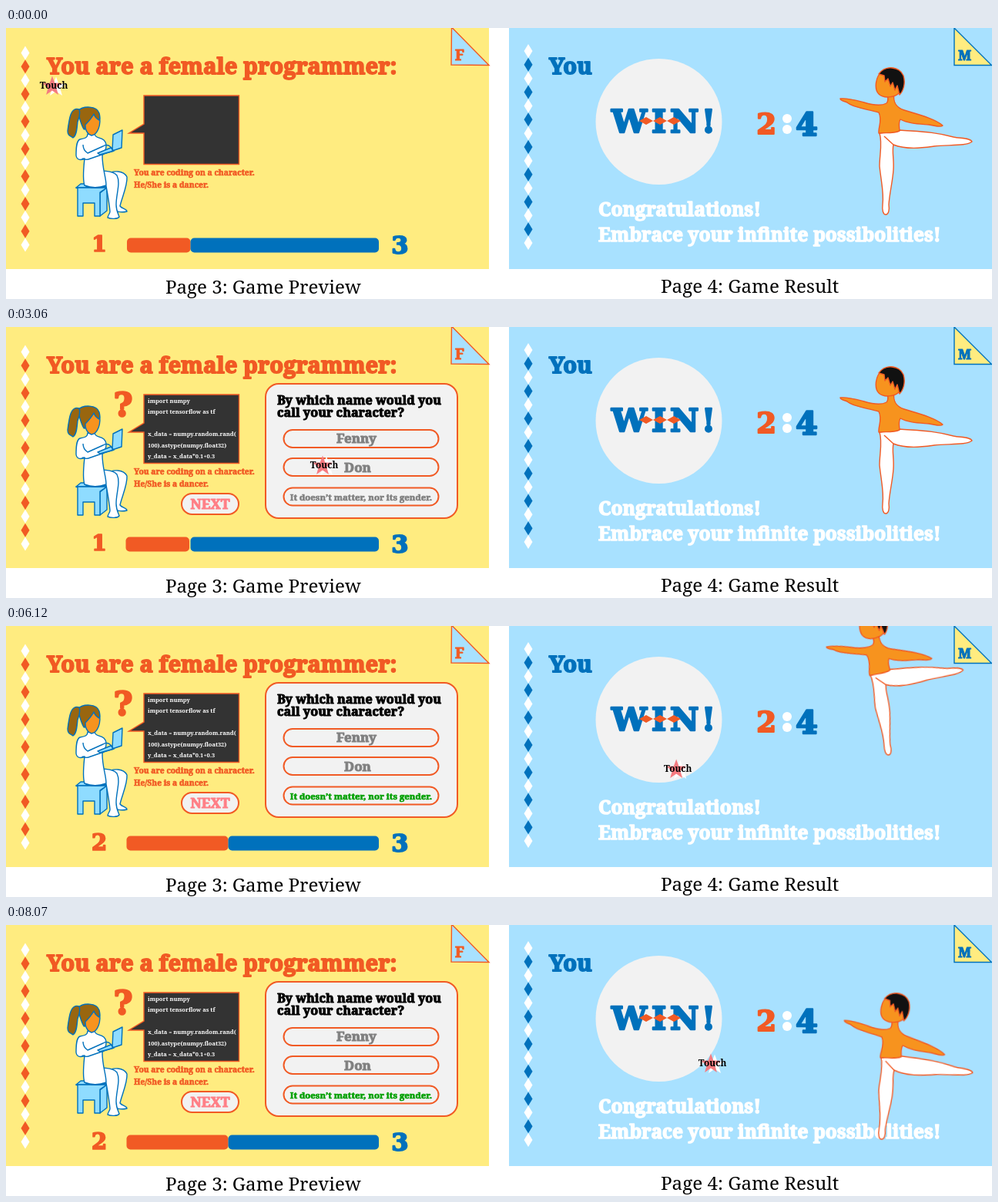
These frames come from a looping animation (1280 px wide and 353 px high, 8100 ms). An HTML page:

```html
<!DOCTYPE html>
<html lang="en">
<head>
<meta charset="utf-8">
<title>Game preview and result</title>
<style>
html, body { margin: 0; width: 100%; height: 100%; overflow: hidden; background: #fff; }
svg { display: block; width: 100%; height: 100%; }
text { font-family: "Noto Serif", "Liberation Serif", serif; white-space: pre; }
.b { font-weight: 700; fill: currentColor; stroke: currentColor; stroke-width: .06em; stroke-linejoin: round; }
.wide { font-family: "DejaVu Serif", "Noto Serif", serif; }
.thin { font-weight: 700; }
.code { font-weight: 700; font-size: 7.5px; fill: #fff; }
.mid { text-anchor: middle; }
.red { color: #f15a24; }
.blue { color: #0071bc; }
.white { color: #fff; }
.gray { color: #808080; }
.pink { color: #ff7f86; }
.box { fill: #f2f2f2; stroke: #f15a24; stroke-width: 2; }
.lady { stroke: #0071bc; stroke-width: 1.4; stroke-linejoin: round; }
.man { stroke: #f15a24; stroke-width: 1.4; stroke-linejoin: round; }

.a { animation: 8100ms linear infinite; }
#touch { animation-name: touch; animation-timing-function: ease-in-out; }
#dancer { animation-name: leap; animation-timing-function: cubic-bezier(.37, 0, .63, 1); transform-origin: 1150px 130px; }
#next { animation-name: next; animation-timing-function: step-end; }
#ask { animation-name: ask; transform-origin: 152px 100px; }
#panel { animation-name: panel; animation-timing-function: step-end; }
#answer { animation-name: answer; animation-timing-function: step-end; }
#one { animation-name: one; animation-timing-function: step-end; }
#two { animation-name: two; animation-timing-function: step-end; }
#done { animation-name: done; animation-timing-function: ease-in-out; }
#left { animation-name: left; animation-timing-function: ease-in-out; }

@keyframes touch {
  0%, 7.4% { transform: translate(62px, 75px); }
  17.9% { transform: translate(365px, 153px); }
  25.2%, 31.1% { transform: translate(268px, 232px); }
  37.78% { transform: translate(413px, 180px); }
  43.2% { transform: translate(452px, 123px); }
  48.8% { transform: translate(566px, 205px); }
  51.5% { transform: translate(552px, 220px); }
  52.3% { transform: translate(553px, 224px); }
  59% { transform: translate(553px, 225px); animation-timing-function: ease-in; }
  62.2% { transform: translate(604px, 224px); animation-timing-function: linear; }
  75.56% { transform: translate(872px, 186px); animation-timing-function: ease-out; }
  79.5%, 100% { transform: translate(917px, 180px); }
}
@keyframes leap {
  0%, 66.7% { transform: translate(0, 0) rotate(0); }
  75.56% { transform: translate(-13px, -75px) rotate(-8.5deg); }
  80.1% { transform: translate(10px, 62px) rotate(6.9deg); }
  87.5% { transform: translate(-11px, -71px) rotate(-8deg); }
  93.2% { transform: translate(3px, 45px) rotate(5deg); }
  96.6% { transform: translate(2px, 25px) rotate(2.8deg); }
  99.6%, 100% { transform: translate(2.5px, 37px) rotate(4.1deg); }
}
@keyframes next { 0% { opacity: 0; } 22.2%, 100% { opacity: 1; } }
@keyframes panel { 0% { opacity: 0; } 31.5%, 100% { opacity: 1; } }
@keyframes ask {
  0%, 22.2% { opacity: 0; transform: rotate(-35deg) scale(1.2); }
  22.3% { opacity: 1; transform: rotate(-35deg) scale(1.2); }
  24.5% { transform: rotate(25deg) scale(1.1); }
  26.7% { transform: rotate(-15deg); }
  28.6%, 100% { opacity: 1; transform: rotate(0); }
}
@keyframes answer { 0% { color: #808080; } 59%, 100% { color: #00a000; } }
@keyframes one { 0% { opacity: 1; } 60.5%, 100% { opacity: 0; } }
@keyframes two { 0% { opacity: 0; } 60.5%, 100% { opacity: 1; } }
@keyframes done {
  0%, 27%, 52% { x: 157px; width: 82.5px; }
  17%, 38% { x: 155.5px; width: 82.5px; }
  62.6% { x: 156.5px; width: 83px; }
  71%, 100% { x: 156.5px; width: 132px; }
}
@keyframes left {
  0%, 62.6% { x: 239.5px; width: 244.5px; }
  71%, 100% { x: 288.5px; width: 195.5px; }
}
</style>
</head>
<body>
<svg viewBox="0 0 1280 353" preserveAspectRatio="none">
  <rect width="627" height="314" fill="#ffec80"/>
  <rect x="653" width="627" height="314" fill="#a8e1ff"/>
  <g id="beads"></g>

  <!-- preview page -->
  <path d="M578.5-1L578 48L627 48.5Z" fill="#a8e1ff" stroke="#f15a24" stroke-width="1.4"/>
  <text class="b red" x="583" y="42" font-size="19">F</text>
  <text class="b red" x="53" y="60" font-size="29.250">You are a female programmer:</text>

  <g class="lady" fill="#8fdcff">
    <path d="M97 203H141L144 210L131 208V238L122 245V215L131 208H91Z"/>
    <path d="M91 208H131L122 214V245H115V228H100V245H93V209Z"/>
  </g>
  <g class="lady" fill="#fff">
    <path d="M128 192C140 184 153 186 157 194C158 205 150 222 148 232C151 236 157 235 157 239C149 241 142 239 139 236C140 222 143 210 140 203Z"/>
    <path d="M101 186C116 186 138 184 144 192C149 202 143 216 143 230C143 238 146 243 147 246C145 249 136 249 132 247C132 244 135 242 135 239C134 228 132 217 130 206C118 210 106 208 102 205Z"/>
    <path d="M106 138C106 143 102 144 96 145C91 147 91 158 91 166C92 173 98 172 102 170C101 180 99 196 102 205C112 209 122 208 130 205C130 194 125 184 125 166C129 161 133 152 127 146C122 142 116 144 115 138Z"/>
    <path d="M100 152C100 158 103 161 106 163L126 154C132 150 137 155 140 160L130 163L107 171C103 172 101 171 99 170" fill="none"/>
  </g>
  <g class="lady">
    <path d="M104 110C110 105 119 106 121 113C124 126 119 139 111 140C103 138 99 122 104 110Z" fill="#f7931e"/>
    <path d="M93 108C100 101 118 101 121 111C122 115 122 118 121 120C117 118 115 115 114 112C111 118 106 123 103 126C103 132 102 134 100 130C96 122 95 114 93 108Z" fill="#99660f"/>
    <path d="M95 106C84 102 82 118 80 134C80 141 84 140 87 143C92 140 92 130 93 122C95 116 97 112 95 106Z" fill="#99660f"/>
    <path d="M119 163L136 156L140 160L122 165ZM139 139L151 133L150 156L138 160Z" fill="#8fdcff"/>
  </g>

  <path d="M179 88H302.5V177.500H179V137L159.500 137L179 125Z" fill="#333" stroke="#f15a24" stroke-width="1.4"/>
  <g id="code"></g>
  <g class="red">
    <text class="b" x="166" y="192" font-size="10.3">You are coding on a character.</text>
    <text class="b" x="166" y="208" font-size="10.3">He/She is a dancer.</text>
  </g>

  <g id="next" class="a">
    <rect class="box" x="228" y="217" width="74" height="27" rx="13.500"/>
    <text class="b pink mid" x="265" y="237" font-size="18">NEXT</text>
  </g>
  <g id="ask" class="a"><text class="b wide red mid" x="152" y="115.500" font-size="42">?</text></g>

  <g id="panel" class="a">
    <rect class="box" x="337" y="74" width="249" height="175" rx="17"/>
    <text class="b" x="352" y="101" font-size="16.200">By which name would you</text>
    <text class="b" x="352" y="117" font-size="16.200">call your character?</text>
    <rect class="box" x="360.500" y="134" width="201" height="23" rx="11.500"/>
    <rect class="box" x="360.500" y="171" width="201" height="23" rx="11.500"/>
    <rect class="box" x="360.500" y="209.500" width="201" height="23" rx="11.500"/>
    <text class="b gray mid" x="455" y="151" font-size="17">Fenny</text>
    <text class="b gray mid" x="456.500" y="188.500" font-size="17">Don</text>
    <text id="answer" class="a b gray mid" x="461" y="225.500" font-size="11.400">It doesn’t matter, nor its gender.</text>
  </g>

  <rect id="done" class="a" x="157" y="273.500" width="82.500" height="19" rx="5" fill="#f15a24"/>
  <rect id="left" class="a" x="239.500" y="273.500" width="244.500" height="19" rx="5" fill="#0071bc"/>
  <g id="one" class="a"><text class="b wide red mid" x="121" y="291" font-size="28">1</text></g>
  <g id="two" class="a"><text class="b wide red mid" x="121" y="291.500" font-size="29">2</text></g>
  <text class="b wide blue mid" x="511.500" y="293.500" font-size="32">3</text>
  <text x="207" y="346" font-size="24.100">Page 3: Game Preview</text>

  <!-- result page -->
  <path d="M1231 0V48.500L1279.500 48.500Z" fill="#ffec80" stroke="#0071bc" stroke-width="1.4"/>
  <text class="b blue" x="1236" y="42" font-size="18">M</text>
  <text class="b blue" x="705" y="60" font-size="29.250">You</text>
  <circle cx="847.500" cy="122" r="82" fill="#f2f2f2"/>
  <text class="b wide blue" x="786 838 862 903" y="136" font-size="41">WIN!</text>
  <path d="M822 121l9-5l9 5l-9 5ZM840 121l9-5l9 5l-9 5ZM858 121l9-5l9 5l-9 5Z" fill="#f15a24"/>
  <text class="b wide red mid" x="987" y="137.500" font-size="37">2</text>
  <circle cx="1014" cy="118" r="6" fill="#fff"/>
  <circle cx="1014" cy="132" r="6" fill="#fff"/>
  <text class="b wide blue mid" x="1039.500" y="140" font-size="41">4</text>
  <g class="white">
    <text class="b" x="769" y="245" font-size="24.700">Congratulations!</text>
    <text class="b" x="769" y="277.500" font-size="24.500">Embrace your infinite possibolities!</text>
  </g>
  <text x="850" y="345" font-size="24.200">Page 4: Game Result</text>

  <g id="dancer" class="a man">
    <path d="M1134 137C1138 150 1134 165 1134 180C1136 200 1140 215 1138 230C1137 238 1139 243 1142 243C1146 243 1147 236 1146 230C1147 215 1151 200 1152 185C1153 170 1150 162 1152 152C1170 159 1190 156 1205 154C1225 152 1247 154 1254 148C1252 143 1240 144 1230 142C1205 135 1185 135 1160 133Z" fill="#fff"/>
    <path d="M1140 141L1152 152" fill="none"/>
    <path d="M1083 92C1093 91 1103 94 1114 97C1124 100 1136 102 1143 98C1146 95 1145 91 1144 86H1153C1151 97 1157 104 1166 107C1182 112 1206 118 1216 127C1214 130 1206 127 1198 126C1186 125 1172 125 1161 119C1158 124 1160 130 1160 134C1152 138 1142 136 1133 137C1132 130 1138 120 1133 110C1120 106 1100 104 1092 97C1088 95 1083 95 1083 92Z" fill="#f7931e"/>
    <path d="M1138 56C1128 63 1127 80 1133 86C1139 92 1154 91 1160 84C1167 72 1164 58 1155 53C1149 51 1142 52 1138 56Z" fill="#f7931e"/>
    <path d="M1133 60C1141 48 1160 50 1165 62C1168 72 1165 82 1160 87L1157 75L1154 81L1151 71L1148 76L1145 66L1141 70L1140 62Z" fill="#111"/>
  </g>

  <g id="touch" class="a">
    <path class="star" fill="#fff" transform="translate(3 2)"/>
    <path class="star" fill="#f57b80" transform="translate(-2 1)"/>
    <text class="thin mid" y="4" font-size="11.800">Touch</text>
  </g>
</svg>
<script>
const NS = "http://www.w3.org/2000/svg";
const LOOP = 8100, RATE = 0.062;
const $ = s => document.querySelector(s);
const add = (parent, tag, attrs) => {
  const el = document.createElementNS(NS, tag);
  for (const k in attrs) el.setAttribute(k, attrs[k]);
  return parent.appendChild(el);
};

function beads(x, y, color) {
  for (let i = 0; i < 15; i++)
    add($("#beads"), "path", {
      d: `M${x} ${y + i * 17.86 - 9}l5.500 9l-5.500 9l-5.500-9Z`,
      fill: i % 2 ? color : "#fff"
    });
}
beads(25, 32.5, "#f15a24");
beads(678, 30, "#0071bc");

const points = Array.from({ length: 10 }, (_, i) => {
  const r = i % 2 ? 5.6 : 13.5, a = i * Math.PI / 5;
  return [r * Math.sin(a), -r * Math.cos(a)].map(v => v.toFixed(2));
});
document.querySelectorAll(".star").forEach(p => p.setAttribute("d", "M" + points.join("L") + "Z"));

const lines = [
  "import numpy",
  "import tensorflow as tf",
  "",
  "x_data = numpy.random.rand(",
  "100).astype(numpy.float32)",
  "y_data = x_data*0.1+0.3"
];
const rows = lines.map((_, i) => add($("#code"), "text", { class: "code", x: 184, y: 98.5 + i * 14.55 }));

function type(now) {
  let n = Math.floor((now % LOOP) * RATE);
  lines.forEach((line, i) => {
    const part = line.slice(0, Math.max(0, n));
    if (rows[i].textContent !== part) rows[i].textContent = part;
    n -= line.length;
  });
  requestAnimationFrame(type);
}
requestAnimationFrame(type);
</script>
</body>
</html>
```
